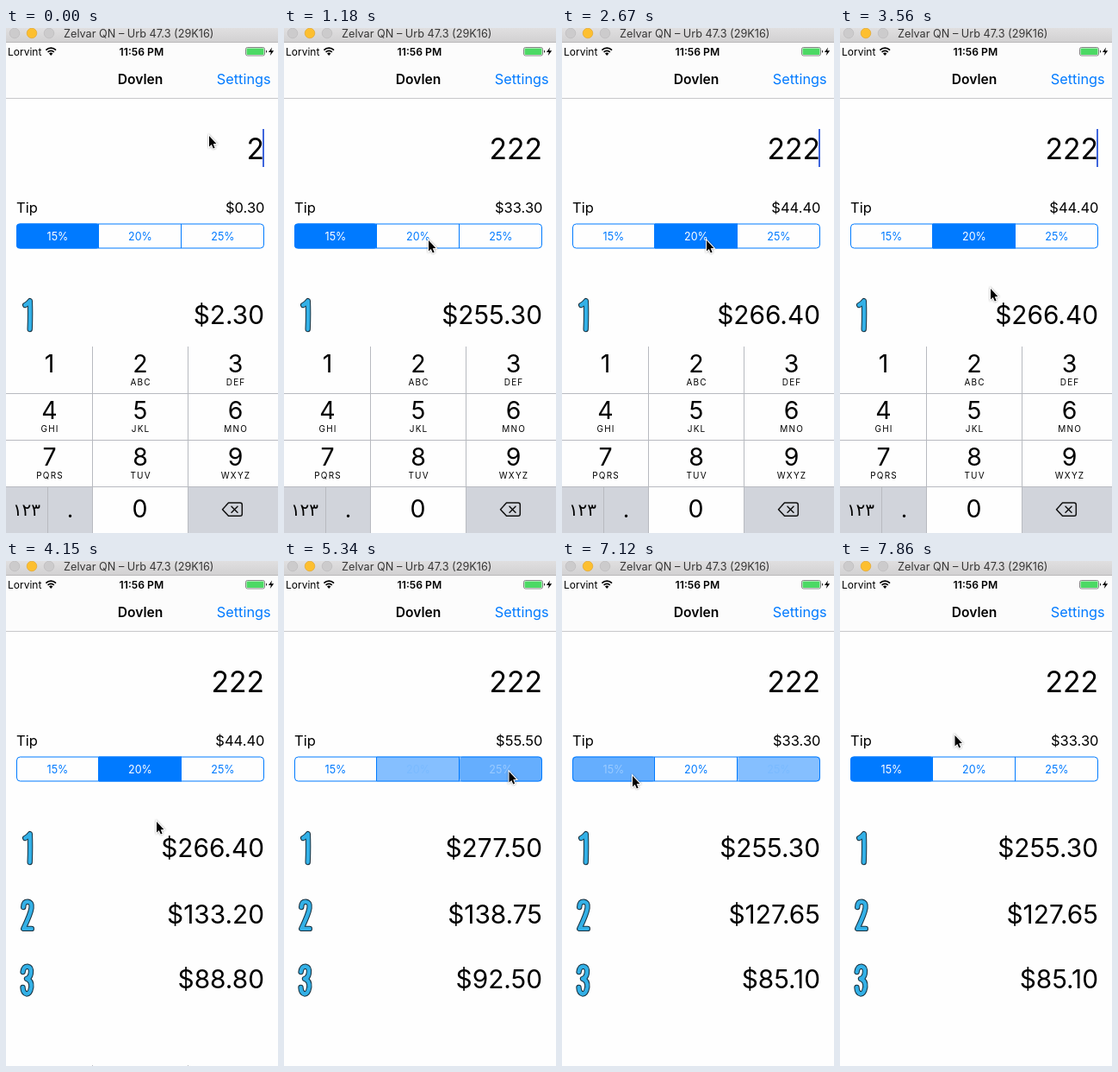
An HTML page that plays this animation: 316 by 585 pixels, repeating every 8000 ms.

```html
<!DOCTYPE html>
<html lang="en">
<head>
<meta charset="utf-8">
<title>Tip calculator</title>
<style>
  html, body { margin: 0; width: 100%; height: 100%; overflow: hidden; background: #fefefe; }
  svg { display: block; width: 316px; height: 585px; }
  text { font-family: Inter, "Open Sans", sans-serif; }
  .end { text-anchor: end; }
  .mid { text-anchor: middle; }
  .total { font-size: 29.8px; }
  .line { stroke: #b8bac0; stroke-width: 1; }
  #pointer { filter: drop-shadow(0 .8px .8px rgba(0, 0, 0, .4)); }
</style>
</head>
<body>
<svg viewBox="0 0 316 585" xmlns="http://www.w3.org/2000/svg">
  <defs>
    <linearGradient id="bar" x2="0" y2="1">
      <stop stop-color="#e0dfe0"/><stop offset="1" stop-color="#d2d1d2"/>
    </linearGradient>
  </defs>
  <rect width="316" height="585" fill="#fefefe"/>

  <!-- status and navigation bars -->
  <rect width="316" height="81" fill="#fcfcfc"/>
  <path d="M0 81.5H316" stroke="#c8c8ca"/>
  <rect width="316" height="16" fill="url(#bar)"/>
  <path d="M0 16.5H316" stroke="#b9b8b9"/>
  <g fill="#cccbcc" stroke="#bcbbbc" stroke-width=".7">
    <circle cx="10" cy="6" r="5.8"/>
    <circle cx="30" cy="6" r="5.8" fill="#fdbf2f" stroke="#e2a630"/>
    <circle cx="50" cy="6" r="5.8"/>
  </g>
  <text x="67" y="11" font-size="12.7" fill="#363636">Zelvar QN – Urb 47.3 (29K16)</text>
  <text x="2" y="31.5" font-size="12">Lorvint</text>
  <g fill="none" stroke="#000" stroke-width="1.7">
    <path d="M46.4 25.6A8.2 8.2 0 0 1 58 25.6M48.6 28A5 5 0 0 1 55.8 28"/>
    <path d="M52.2 32L50 29.6A3.1 3.1 0 0 1 54.4 29.6Z" fill="#000" stroke="none"/>
  </g>
  <text class="mid" x="157.4" y="31.5" font-size="12.2" font-weight="600">11:56 PM</text>
  <rect x="278.5" y="22.5" width="22" height="9.5" rx="2" fill="#fff" stroke="#666" stroke-width=".8"/>
  <rect x="279.5" y="23.5" width="20" height="7.5" rx="1" fill="#4cd964"/>
  <path d="M302 25.5Q304 27.2 302 29Z"/>
  <path d="M309 22.5L305 28H307.8L306.8 32L311.2 26.2H308.2Z"/>
  <text class="mid" x="156" y="65" font-size="15.6" font-weight="600">Dovlen</text>
  <text class="end" x="307.6" y="65" font-size="16.3" fill="#007aff">Settings</text>

  <!-- bill and tip -->
  <text id="bill" class="end" x="300" y="151.5" font-size="33.6"></text>
  <rect id="caret" x="298" y="117" width="2" height="44" fill="#3f66dc"/>
  <text x="12" y="214" font-size="16.5">Tip</text>
  <text id="tip" class="end" x="300.5" y="214" font-size="16.5"></text>
  <g id="segments"></g>
  <rect x="12.5" y="227" width="287" height="28" rx="4" fill="none" stroke="#007aff"/>
  <path d="M107.5 227V255M203.5 227V255" stroke="#007aff"/>

  <!-- totals per head count -->
  <g id="numerals" fill="none" stroke-linecap="round" stroke-linejoin="round"></g>
  <text class="total end" x="300" y="342.5"></text>
  <text class="total end" x="300" y="420"></text>
  <text class="total end" x="300" y="494.5"></text>

  <g id="keyboard">
    <rect y="369" width="316" height="216" fill="#fefefe"/>
    <path d="M0 531.5H100.5V585H0ZM211.5 531.5H316V585H211.5Z" fill="#d1d4db"/>
    <path class="line" d="M0 423.5H316M0 477.5H316M0 531.5H316M100.5 369V585M211.5 369V585M48.5 531V585"/>
    <g id="keys"></g>
    <text class="mid" x="24" y="565" font-size="20" style="font-family:'DejaVu Sans',sans-serif">١٢٣</text>
    <text class="mid" x="74.5" y="567" font-size="26">.</text>
    <g fill="none" stroke="#111" stroke-width="1.5" stroke-linejoin="round" stroke-linecap="round">
      <path d="M258.5 550H272Q274.3 550 274.3 552.3V563Q274.3 565.3 272 565.3H258.5L251.5 557.7Z"/>
      <path d="M262 554.2L269 561.2M269 554.2L262 561.2"/>
    </g>
  </g>

  <path id="pointer" d="M.5 1V13.4L3.3 10.9L5.3 15.5L7.1 14.7L5.2 10.2L8.9 9.9Z"
    stroke="#fff" stroke-width="2" paint-order="stroke"/>
</svg>
<script>
  const LOOP = 8000;
  const NS = "http://www.w3.org/2000/svg";
  const byId = id => document.getElementById(id);

  function add(parent, tag, attrs, text = "") {
    const el = document.createElementNS(NS, tag);
    for (const name in attrs) el.setAttribute(name, attrs[name]);
    el.textContent = text;
    parent.append(el);
    return el;
  }

  // Outlined bubble digits beside the totals
  [
    "M22.2 321Q26 319 27.8 316.2Q28.5 330 27.7 349",
    "M20.2 401Q20.5 394.6 25 394.6Q30.5 395 29.5 402Q28.5 409 20.3 425.9H29.8",
    "M19.6 476Q20.5 469.6 25 469.6Q30 470.5 28.8 478Q27.8 483 24 484Q30 486 29.3 493.5Q28 501.5 24 501.5Q19.8 500.5 19.5 494"
  ].forEach(d => {
    add(byId("numerals"), "path", { d, stroke: "#17303f", "stroke-width": 6.4 });
    add(byId("numerals"), "path", { d, stroke: "#33b0e6", "stroke-width": 4.4 });
  });

  const letters = ["", "ABC", "DEF", "GHI", "JKL", "MNO", "PQRS", "TUV", "WXYZ"];
  const columns = [50.5, 156, 266.5];
  letters.forEach((label, i) => {
    const x = columns[i % 3], y = 399 + 54 * Math.floor(i / 3);
    add(byId("keys"), "text", { class: "mid", x, y, "font-size": 28.5 }, i + 1);
    add(byId("keys"), "text", { class: "mid", x: x + .6, y: y + 15, "font-size": 10, "letter-spacing": 1.2 }, label);
  });
  add(byId("keys"), "text", { class: "mid", x: 155.5, y: 567, "font-size": 28.5 }, 0);

  const rates = [15, 20, 25];
  const segments = rates.map((rate, i) => {
    const left = 12 + 96 * i;
    return {
      fill: add(byId("segments"), "rect", { x: left, y: 226.5, width: 96, height: 29, rx: i === 1 ? 0 : 4, fill: "#007aff" }),
      label: add(byId("segments"), "text", { class: "mid", x: left + 48, y: 245.5, "font-size": 12.5 }, rate + "%")
    };
  });

  // Each track holds its value until the next time: [ms, value...]
  const pointerTrack = [
    [0, 235.5, 124], [890, 222, 150], [1040, 185, 220], [1180, 167.5, 245],
    [2960, 172, 246], [3110, 188, 248], [3260, 220, 252], [3410, 243, 255],
    [3560, 174.5, 301], [4600, 228, 265], [4740, 261, 243], [5930, 215.5, 247],
    [6080, 175.5, 247.5], [6530, 160, 248], [6680, 115, 248], [6820, 81.5, 248], [7860, 133, 201]
  ];
  const caretTrack = [
    [0, 1], [890, .5], [1040, 0], [1330, .5], [1480, 1], [1920, .5], [2070, 0],
    [2370, .5], [2520, 1], [2810, .6], [2960, 0], [3260, .5], [3410, 1], [4150, 0]
  ];
  const billTrack = [[0, 2], [140, 22], [290, 222]];
  const choiceTrack = [[0, 0], [2370, 1], [5340, 2], [7120, 0]];
  const slideTrack = [[0, 0], [4150, 215], [4300, 216]];
  const FADE = 148;

  const keyAt = (track, t) => track.findLastIndex(key => key[0] <= t);
  const valueAt = (track, t) => track[keyAt(track, t)].slice(1);
  const money = n => "$" + n.toFixed(2);
  const blend = p => `rgb(${255 * p},${122 + 133 * p},255)`;

  const totals = document.querySelectorAll(".total");

  function draw(t) {
    const [bill] = valueAt(billTrack, t);
    const k = keyAt(choiceTrack, t);
    const [since, choice] = choiceTrack[k];
    const fading = k > 0 && t - since < FADE;
    const previous = fading ? choiceTrack[k - 1][1] : -1;
    const tip = bill * rates[choice] / 100;

    byId("bill").textContent = bill;
    byId("tip").textContent = money(tip);
    totals.forEach((el, i) => el.textContent = money((bill + tip) / (i + 1)));

    segments.forEach(({ fill, label }, i) => {
      let level = i === choice ? 1 : 0;
      if (fading && i === choice) level = .6;
      if (i === previous) level = .48;
      fill.setAttribute("opacity", level);
      label.setAttribute("fill", blend(level));
    });

    byId("caret").setAttribute("opacity", valueAt(caretTrack, t)[0]);
    byId("keyboard").setAttribute("transform", `translate(0 ${valueAt(slideTrack, t)[0]})`);
    byId("pointer").setAttribute("transform", `translate(${valueAt(pointerTrack, t)})`);
  }

  const start = performance.now();
  function tick() {
    draw((performance.now() - start) % LOOP);
    requestAnimationFrame(tick);
  }
  tick();
</script>
</body>
</html>
```
